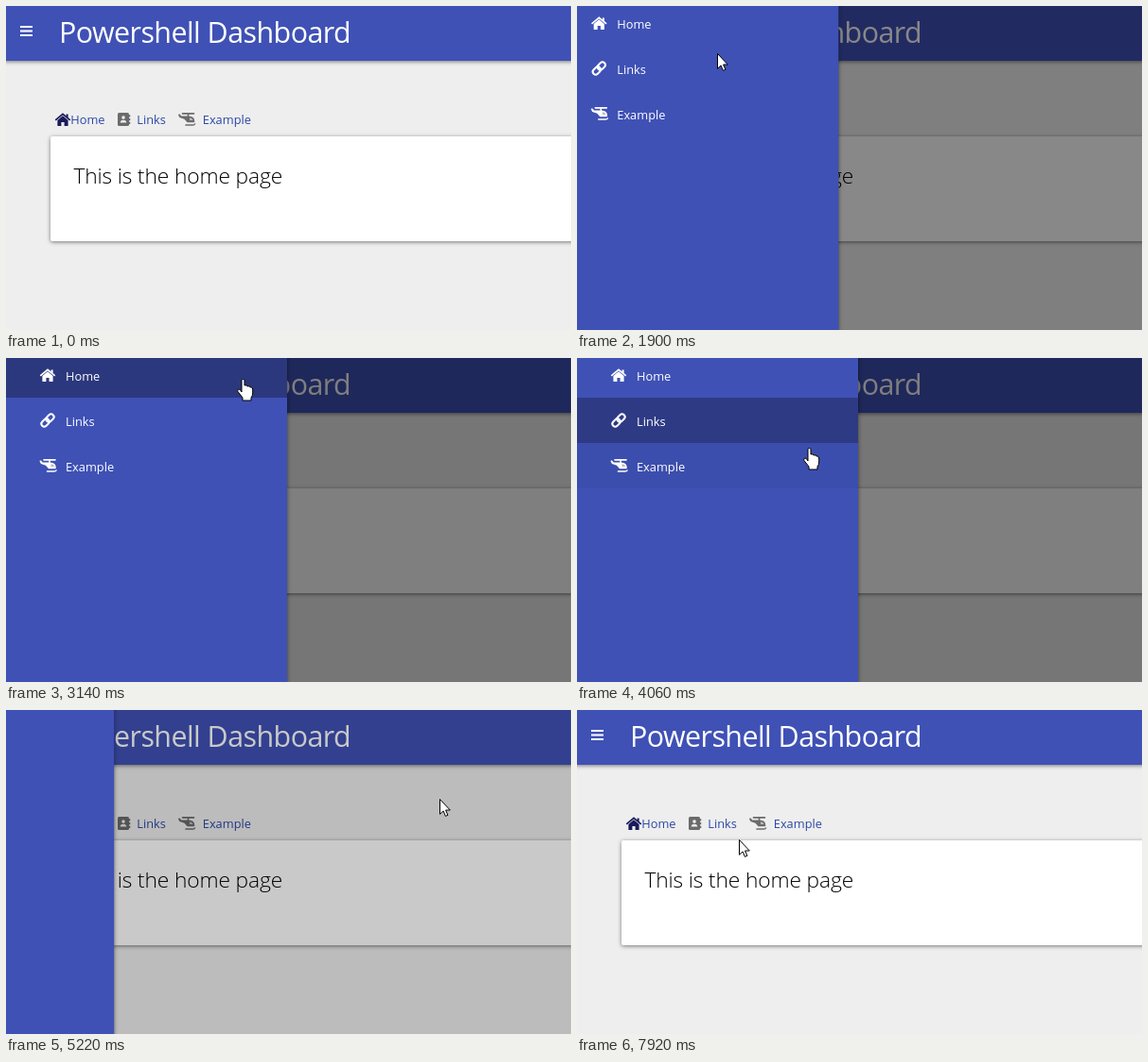
Write an HTML page that moves like this. It is 597 px wide and 343 px high and loops after 8000 ms.

```html
<!DOCTYPE html>
<html lang="en">
<head>
<meta charset="utf-8">
<title>Dashboard</title>
<style>
  html, body { margin: 0; width: 100%; height: 100%; overflow: hidden; background: #eee; }
  svg { display: block; width: 597px; height: 343px; }
  text { font: 12.8px "Open Sans", "Noto Sans", sans-serif; }
  .title { font-size: 30.4px; letter-spacing: -.55px; fill: #fff; }
  .heading { font-size: 22.8px; font-weight: 300; letter-spacing: -.15px; fill: #000; }
  .nav { fill: #2c48a6; color: #6b6b6b; }
  .menu { fill: #fff; color: #fff; }
  .raised { filter: drop-shadow(0 1px 2px rgba(0, 0, 0, .5)); }
  .cursor { fill: #fff; stroke: #000; stroke-linejoin: round; }
</style>
</head>
<body>
<svg viewBox="0 0 597 343">
  <defs>
    <g id="house" fill="currentColor">
      <path d="M.8 7.4 8 1.3 15.2 7.4" fill="none" stroke="currentColor" stroke-width="1.7" stroke-linecap="round"/>
      <path d="M11.6 1.5h2v4l-2-1.7zM8 3.3 13.6 8V13.4Q13.6 14 13 14H9.6V10H6.4V14H3Q2.4 14 2.4 13.4V8Z"/>
    </g>
    <g id="book">
      <rect width="12" height="14" rx="1.5" fill="currentColor"/>
      <path d="M12.6 2.2v2.3M12.6 6v2.3M12.6 9.8v2.3" stroke="currentColor" stroke-width="1.3"/>
      <circle cx="6" cy="5.1" r="1.8" fill="#eee"/>
      <path d="M2.7 10.6Q2.7 7.7 6 7.7T9.3 10.6Z" fill="#eee"/>
    </g>
    <g id="copter" fill="currentColor">
      <path d="M4.5 .9H16.5M10.5 .9V3.5M8 13H15.5Q17 13 17.5 12" fill="none" stroke="currentColor" stroke-width="1.6" stroke-linecap="round"/>
      <path d="M0 2.2Q0 1.6 .6 1.6H1.6L3.2 3.5H11Q17.3 3.8 17.3 9.2Q17.3 10.3 16.3 10.3H9.5L6.5 6.8 1.4 5Z"/>
      <path d="M12 5.2V7.9H15.6Q15 5.4 12 5.2Z" fill="#bbb"/>
    </g>
    <g id="chain" fill="none" stroke="currentColor" stroke-width="2" transform="rotate(-45 7.5 7)">
      <rect x="-.6" y="4" width="9.2" height="6" rx="3"/>
      <rect x="6.4" y="4" width="9.2" height="6" rx="3"/>
    </g>
  </defs>

  <rect width="597" height="343" fill="#eee"/>
  <rect class="raised" x="-10" y="-10" width="617" height="68" fill="#3f51b5"/>
  <path d="M15 22h13M15 26.5h13M15 31h13" stroke="#fff" stroke-width="1.9"/>
  <text class="title" x="56" y="39">Powershell Dashboard</text>

  <g class="nav">
    <use href="#house" x="52" y="113" color="#1a1a5c"/>
    <use href="#book" x="118" y="113"/>
    <use href="#copter" x="182" y="113"/>
    <text x="68.3" y="125">Home</text>
    <text x="138.3" y="125">Links</text>
    <text x="207.8" y="125">Example</text>
  </g>

  <rect class="raised" x="47" y="138" width="570" height="111" rx="2" fill="#fff"/>
  <text class="heading" x="71.5" y="188">This is the home page</text>

  <rect id="shade" width="597" height="343"/>
  <g id="drawer" class="menu">
    <rect class="raised" x="-10" y="-10" width="307" height="363" fill="#3f51b5"/>
    <rect class="row" y="-6" width="297" height="48" fill="#000"/>
    <rect class="row" y="42" width="297" height="48" fill="#000"/>
    <rect class="row" y="90" width="297" height="48" fill="#000"/>
    <use href="#house" x="36" y="11"/>
    <use href="#chain" x="36.5" y="59"/>
    <use href="#copter" x="35.5" y="107"/>
    <text x="63" y="24">Home</text>
    <text x="63" y="72">Links</text>
    <text x="63" y="120">Example</text>
  </g>

  <g id="cursor" class="cursor">
    <path id="arrow" d="M.5.5V16.3L4.1 12.9 6.4 18.4 8.9 17.3 6.6 12H11.3Z"/>
    <path id="hand" d="M-1 14V1.8Q-1 .5.5.5T2 1.8V7Q5 6 5 8Q8 7 8 9Q10.7 8.2 10.7 11V15Q10.7 18 9 20V23H0V20L-5 13.6Q-6.2 11.2-4 11Q-2.2 11.2-1 14Z"/>
  </g>
</svg>

<script>
const LOOP = 8000, REST = 180, FADE = 300, SAMPLES = 15;
const DRAWER_WIDTH = 297, ROW_HEIGHT = 48, ROW_TOP = -6;
const get = id => document.getElementById(id);
const rows = document.querySelectorAll('.row');

// Arrival time and place of each pointer move; the pointer rests before the next.
const stops = [
  [340, 58, 324], [740, 9, 89], [1580, 17, 29], [2360, 332, 80],
  [3140, 250, 22], [3750, 245, 74], [4360, 245, 114], [5050, 458, 94],
  [5830, 150, 162], [6210, 56, 132], [6840, 197, 123], [7340, 159, 121],
  [7680, 227, 119], [7920, 171, 137]
];

function easeOut(t, start, duration) {
  const rest = 1 - Math.min(1, Math.max(0, (t - start) / duration));
  return 1 - rest * rest;
}

function pointerAt(t) {
  let [left, x, y] = stops[0];
  for (const [arrival, toX, toY] of stops.slice(1)) {
    const start = left + REST;
    const part = easeOut(t, start, arrival - start);
    x += (toX - x) * part;
    y += (toY - y) * part;
    left = arrival;
  }
  return [Math.round(x), Math.round(y)];
}

const opening = (t, closeDuration) =>
  easeOut(t, 1717, 250) - easeOut(t, 5145, closeDuration);

function rowAt(t) {
  const [x, y] = pointerAt(t);
  const usable = opening(t, 200) === 1 && x < DRAWER_WIDTH;
  return usable ? Math.floor((y - ROW_TOP) / ROW_HEIGHT) : -1;
}

// A hover fades in and out linearly: its strength is its share of the last FADE ms.
function hoverStrengths(t) {
  const strengths = [0, 0, 0];
  for (let i = 0; i < SAMPLES; i++) {
    const row = rowAt(t - i * FADE / SAMPLES);
    if (row in strengths) strengths[row] += 1 / SAMPLES;
  }
  return strengths;
}

function isClickable(t, x, y) {
  const open = opening(t, 200);
  if (open) return rowAt(t) in rows;
  const onMenuButton = x < 50 && y < 58;
  const onLinks = x > 51 && x < 259 && y > 112 && y < 131;
  return onMenuButton || onLinks;
}

const show = (id, visible) => get(id).style.display = visible ? '' : 'none';

function draw(t) {
  const open = opening(t, 200);
  get('drawer').setAttribute('transform', `translate(${DRAWER_WIDTH * (open - 1)})`);
  show('drawer', open);
  get('shade').style.opacity = opening(t, 216) / 2;
  hoverStrengths(t).forEach((strength, i) => rows[i].style.opacity = .31 * strength);

  const [x, y] = pointerAt(t);
  const clickable = isClickable(t, x, y);
  get('cursor').setAttribute('transform', `translate(${x} ${y})`);
  show('cursor', t >= 660 || (t >= 340 && t < 430));
  show('hand', clickable);
  show('arrow', !clickable);
}

function tick() {
  draw(performance.now() % LOOP);
  requestAnimationFrame(tick);
}
tick();
</script>
</body>
</html>
```
